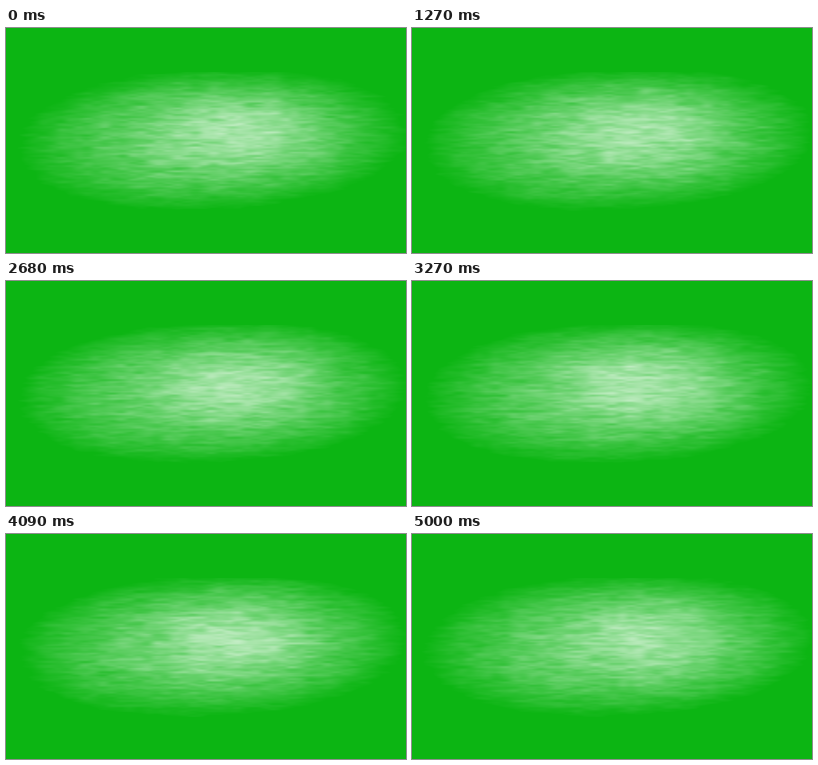
Write an HTML page with a canvas that moves like this. It is 400 px wide and 225 px high and loops after 5.05 s.

```html
<!DOCTYPE html>
<html lang="en">
<head>
<meta charset="utf-8">
<title>Shimmering light on green</title>
<style>
  html, body { margin: 0; width: 100%; height: 100%; overflow: hidden; background: rgb(12, 181, 19); }
  canvas { display: block; width: 100vw; height: 100vh; }
</style>
</head>
<body>
<canvas id="stage" width="400" height="225"></canvas>
<script>
const W = 400, H = 225, LOOP = 5050, STEPS = 111;
const GREEN = [12, 181, 19];
const TOP = 44, BOTTOM = 190;
const ctx = document.getElementById('stage').getContext('2d');
const image = ctx.createImageData(W, H);

const smooth = t => t * t * (3 - 2 * t);
const clamp = t => Math.max(0, Math.min(1, t));
const mix = (a, b, t) => a + (b - a) * t;

// Seeded lattice of random values, 256 long.
let seed = 71;
const random = () => (seed = (seed * 16807) % 2147483647) / 2147483647;
const values = Float32Array.from({ length: 256 }, random);
const shuffle = Uint8Array.from({ length: 256 }, () => random() * 256);
const rowOffset = (y, z) => shuffle[(shuffle[z & 255] + y) & 255];

// Smooth value noise in two space axes and time.
function noise(x, y, z) {
  const xi = Math.floor(x), yi = Math.floor(y), zi = Math.floor(z);
  const fx = smooth(x - xi), fy = smooth(y - yi), fz = smooth(z - zi);
  const along = (row, layer) => {
    const o = rowOffset(row, layer) * 7 + xi;
    return mix(values[shuffle[o & 255]], values[shuffle[(o + 1) & 255]], fx);
  };
  return mix(
    mix(along(yi, zi), along(yi + 1, zi), fy),
    mix(along(yi, zi + 1), along(yi + 1, zi + 1), fy), fz);
}

// Long, flat streaks that drift sideways and reshape.
// The slant in time keeps the contrast even from moment to moment.
function streaks(x, y, s) {
  const slant = x * 0.013 + y * 0.09;
  return 0.5 * noise((x + s * 9) / 19, y / 2.6, s * 4.5 + slant)
       + 0.3 * noise((x - s * 6) / 9 + 40, y / 1.7 + 70, s * 6 + 30 + slant)
       + 0.2 * noise(x / 40 + 90, y / 7 + 20, s * 2 + 60 + slant);
}

// The still parts of the glow: distance to the rim and strength.
const rim = new Float32Array(W * H), glow = new Float32Array(W * H);
for (let y = TOP; y < BOTTOM; y++) {
  for (let x = 0; x < W; x++) {
    const u = Math.abs(x - 206) / 192;
    const v = Math.abs(y - (111 - 0.035 * (x - 200))) / 70;
    rim[y * W + x] = u ** 2.2 + v ** 2.2;
    glow[y * W + x] = 0.36
      + 0.29 * Math.exp(-(((x - 234) / 85) ** 2) - ((y - 101) / 44) ** 2);
  }
}

function draw(time) {
  const s = Math.floor((time % LOOP) / LOOP * STEPS) / STEPS * LOOP / 1000;
  for (let y = 0, i = 0; y < H; y++) {
    for (let x = 0; x < W; x++, i++) {
      let a = 0;
      if (glow[i] && rim[i] < 1.2) {
        const n = streaks(x, y, s) - 0.5;
        const edge = clamp(1 - rim[i] + n * 0.2);
        a = clamp(edge * (glow[i] + n * 0.36));
      }
      for (let c = 0; c < 3; c++) image.data[i * 4 + c] = mix(GREEN[c], 255, a);
      image.data[i * 4 + 3] = 255;
    }
  }
  ctx.putImageData(image, 0, 0);
}

let start, shown = -1;
function tick(now) {
  start ??= now;
  const step = Math.floor((now - start) / LOOP * STEPS);
  if (step !== shown) draw(now - start);
  shown = step;
  requestAnimationFrame(tick);
}
draw(0);
requestAnimationFrame(tick);
</script>
</body>
</html>
```
